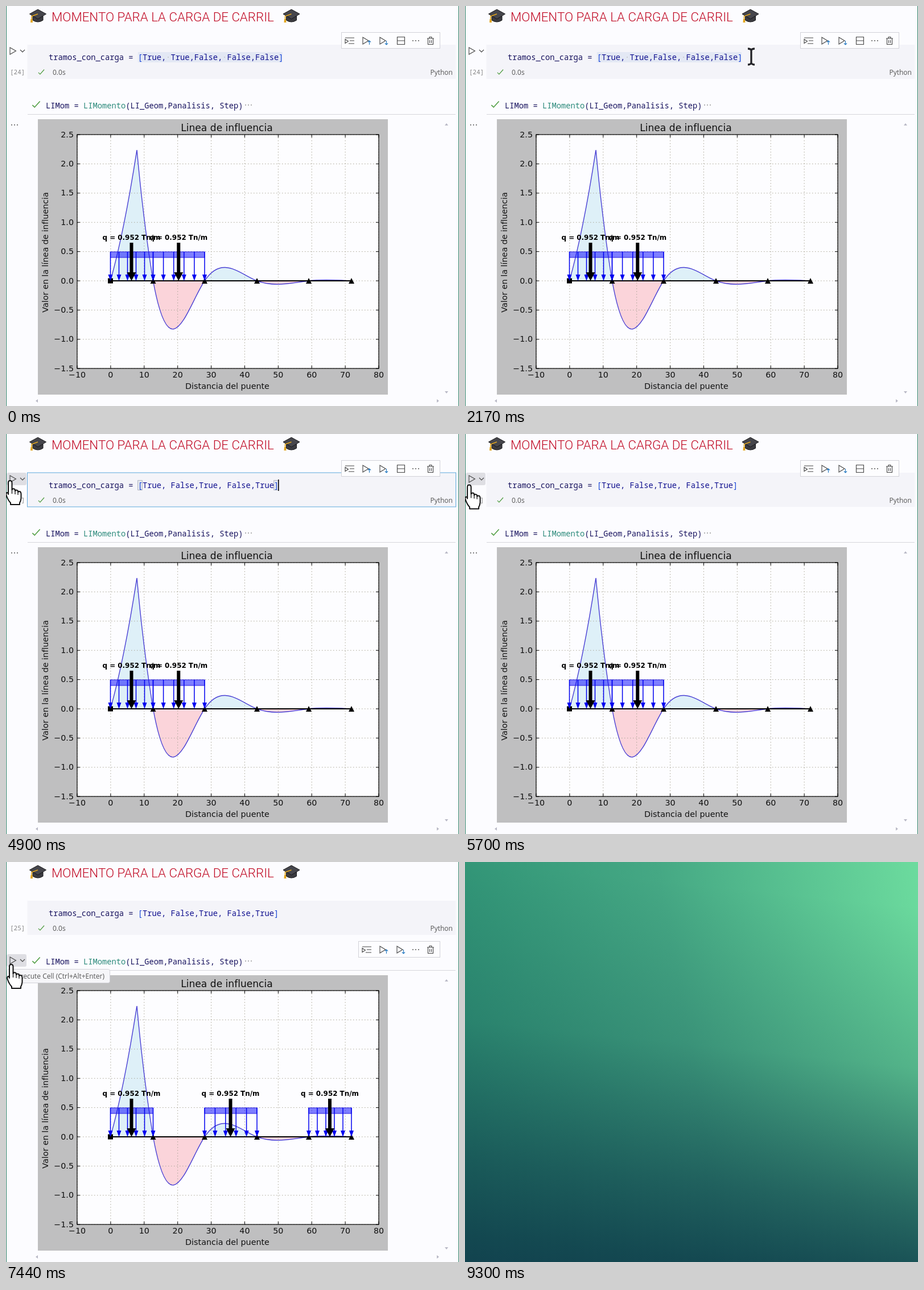
An HTML page for the animation above (9.33 s loop, 796 px wide and 703 px high).

```html
<!DOCTYPE html>
<html lang="es">
<head>
<meta charset="utf-8">
<style>
html, body { margin: 0; width: 100%; height: 100%; overflow: hidden; }
body {
  background:
    linear-gradient(186deg, #12454f00 10%, #12454f38 46%, #12454fb8 77%, #12454ff5 94%, #12434f 100%),
    linear-gradient(80deg, #2c9073, #45a884 50%, #6cdb9e);
}
svg { display: block; width: 796px; height: 703px; }
.code { font: 13.75px "Noto Sans Mono", monospace; fill: #17125e; white-space: pre; }
.ui { font: 12px "Open Sans", sans-serif; fill: #555; }
.count { font: 11px "Noto Sans Mono", monospace; fill: #858585; }
.plot { font: 14.3px "DejaVu Sans", sans-serif; fill: #111; }
.load { font: bold 11.9px "DejaVu Sans", sans-serif; text-anchor: middle; fill: #000; }
#title { font: 300 26px Roboto, sans-serif; font-stretch: 75%; fill: #c00822; }
.icon { fill: none; stroke: #444; stroke-width: 1.1; }
.ok { fill: none; stroke: #4a9a3c; stroke-width: 1.4; }
.dots { fill: #555; }
.box { fill: #fdfdff; stroke: #d2d2d8; }
</style>
</head>
<body>
<svg id="stage" viewBox="0 0 796 703"></svg>
<script>
const stage = document.getElementById('stage');
const LOOP = 9330;
const X0 = 183.9, Y0 = 483;
const px = v => X0 + v * 5.889;
const py = v => Y0 - v * 102.75;
const supports = [183.5, 258.5, 349, 441, 532, 607];

const at = (x, y, body, extra = '') => `<g transform="translate(${x} ${y})" ${extra}>${body}</g>`;
const line = (x1, y1, x2, y2, extra = '') => `<path d="M${x1} ${y1}L${x2} ${y2}" ${extra}/>`;
const text = (x, y, cls, body, extra = '') => `<text x="${x}" y="${y}" class="${cls}" ${extra}>${body}</text>`;
const group = (id, body) => `<g id="${id}">${body}</g>`;
const range = (n, f) => Array.from({ length: n }, (_, i) => f(i)).join('');

// Icons, each centred on its own origin
const dots = '<g class="dots"><circle cx="-5" r="1"/><circle r="1"/><circle cx="5" r="1"/></g>';
const play = '<path class="icon" d="M-5-6L5.5 0L-5 6Z"/>';
const chevron = '<path class="icon" d="M-4-2L0 2L4-2"/>';
const check = s => `<path class="ok" transform="scale(${s})" d="M-6 1L-2.5 4.5L6-5"/>`;
const runLine = '<path class="icon" d="M-8-5H8M0 0H8M-2 5H8M-8-2.5L-2.5 1L-8 4.5Z"/>';
const playUp = '<path class="icon" d="M-6-6L4 0L-6 6Z"/><path class="icon" style="stroke:#2277c0" d="M5.5 7V0M3 2.5L5.5 0L8 2.5"/>';
const playDown = '<path class="icon" d="M-6-6L4 0L-6 6Z"/><path class="icon" style="stroke:#2277c0" d="M5.5 0V7M3 4.5L5.5 7L8 4.5"/>';
const split = '<path class="icon" d="M-6.5-6.5H6.5V6.5H-6.5ZM-6.5 0H6.5"/>';
const trash = '<path class="icon" d="M-6-4H6M-2-4V-6.500H2V-4M-4.500-4V6.500H4.500V-4M-1.500-1V4M1.500-1V4"/>';
const history = '<path class="icon" stroke-width="1.3" d="M-6-2A6.500 6.500 0 1 1-6 3M-6.500-6V-2H-2.500M0-4V1H4"/>';
const cap = `
  <path fill="#3b3b40" stroke="#17171a" d="M-9 1V8Q0 14 9 8V1Z"/>
  <path fill="#46464c" stroke="#17171a" d="M-14.500-3L0-11L14.500-3L0 6Z"/>
  <path fill="none" stroke="#e2a51c" stroke-width="1.600" d="M0-3L-11 1V8"/>
  <path fill="#e2a51c" d="M-12.500 6H-9.500L-9 12H-13Z"/>`;

const toolbar = (x, y, icons) =>
  `<rect class="box" x="${x + .5}" y="${y + .5}" width="${762 - x}" height="28"/>` +
  icons.map(([cx, icon]) => at(cx, y + 15, icon)).join('');
const runButton = y => at(12, y, play) + at(29, y, chevron);
const hoverBox = y => `<rect x="1" y="${y - 11}" width="35" height="22" rx="3" fill="#dedee3"/>`;

const token = (body, color) => `<tspan fill="${color}">${body}</tspan>`;
const assign = list => text(75, 95, 'code', 'tramos_con_carga = ' +
  token('[', '#1745d8') + token(list, '#10108f') + token(']', '#1745d8'));

// Cubic through a span with given end slopes
const span = (i, s0, s1) => {
  const a = supports[i], b = supports[i + 1], d = (b - a) / 3;
  return { a, curve: `C${a + d} ${Y0 + s0 * d} ${b - d} ${Y0 - s1 * d} ${b} ${Y0}` };
};
const curves = [
  { a: supports[0], curve: `C199 428 216 343 230 253C238 341 249 425 258.5 ${Y0}` },
  span(1, 5.5, -1.5), span(2, -1.5, .4), span(3, .38, -.12), span(4, -.12, .05)
];

const loadOn = i => {
  const a = supports[i], b = supports[i + 1], c = (a + b) / 2 - .5;
  const arrows = range(6, k => {
    const x = a + (b - a) * k / 5;
    return `<path d="M${x} 432V474" stroke="#0000f0" stroke-width="1.500"/>
      <path fill="#0000f0" d="M${x - 4} 472H${x + 4}L${x} 483Z"/>`;
  });
  return `<rect x="${a}" y="432" width="${b - a}" height="10" fill="#0000ff" fill-opacity=".5" stroke="#2a20e0"/>
    ${arrows}
    <path d="M${c - 3} 416H${c + 3}V468H${c + 8}L${c} 483L${c - 8} 468H${c - 3}Z"/>
    ${text(c, 411, 'load', 'q = 0.952 Tn/m')}`;
};

const xTicks = range(10, i => {
  const v = i * 10 - 10, x = px(v);
  return line(x, 226, x, 637, 'stroke="#a8a494" stroke-dasharray="1.500 3.500"') +
    line(x, 637, x, 632, 'stroke="#000"') + line(x, 226, x, 231, 'stroke="#000"') +
    text(x, 653, 'plot', String(v).replace('-', '−'), 'text-anchor="middle"');
});
const yTicks = range(9, i => {
  const v = i / 2 - 1.5, y = py(v);
  return line(125, y, 655, y, 'stroke="#a8a494" stroke-dasharray="1.500 3.500"') +
    line(125, y, 130, y, 'stroke="#000"') + line(650, y, 655, y, 'stroke="#000"') +
    text(119, y + 4.5, 'plot', v.toFixed(1).replace('-', '−'), 'text-anchor="end"');
});

const chart = `
  <rect x="56" y="199" width="615" height="484" fill="#bfbfc0"/>
  <rect x="125" y="226" width="530" height="411" fill="#fdfdff"/>
  ${curves.map((c, i) => `<path fill="${i % 2 ? '#fbd4da' : '#def0f8'}" d="M${c.a} ${Y0}${c.curve}Z"/>`).join('')}
  ${xTicks}${yTicks}
  <rect x="125" y="226" width="530" height="411" fill="none" stroke="#000" stroke-width="1.200"/>
  <path fill="none" stroke="#4a40d4" stroke-width="1.400" d="M183.5 ${Y0}${curves.map(c => c.curve).join('')}"/>
  ${line(183.5, Y0, 607, Y0, 'stroke="#000" stroke-width="2"')}
  <rect x="179" y="478.500" width="9" height="9"/>
  ${supports.slice(1).map(x => `<path d="M${x} 478L${x + 5} 488H${x - 5}Z"/>`).join('')}
  ${group('loadsBefore', loadOn(0) + loadOn(1))}
  ${group('loadsAfter', loadOn(0) + loadOn(2) + loadOn(4))}
  ${text(388, 220, 'plot', 'Linea de influencia', 'text-anchor="middle" style="font-size:17.1px"')}
  ${text(389, 673, 'plot', 'Distancia del puente', 'text-anchor="middle"')}
  ${text(0, 0, 'plot', 'Valor en la línea de influencia', 'text-anchor="middle" transform="translate(74 433) rotate(-90)"')}`;

const beam = 'M-6-14Q-1-14 0-11Q1-14 6-14M0-11V11M-6 14Q-1 14 0 11Q1 14 6 14';
const cursors = group('beam', `
    <path d="${beam}" fill="none" stroke="#fff" stroke-width="6"/>
    <path d="${beam}" fill="none" stroke="#24242a" stroke-width="3.400"/>`) +
  group('hand', `<path fill="#fff" stroke="#111" stroke-width="2" stroke-linejoin="round"
    d="M-3 3Q-3-1 0-1Q3.500-1 3.500 3V15Q5 12 8.500 14L9 17Q11 14 14 17V19Q19 16 19.500 22V30Q19 35 17 38V41H1V38Q-3 34-6 26Q-8 21-5 20Q-3 20-3 23Z"/>
    <path fill="none" stroke="#111" stroke-width="1.300" d="M3.500 14V22M9 16V23M14 18V24"/>`);

stage.innerHTML = group('win', `
  <rect width="796" height="703" fill="#fcfcff"/>
  ${at(56, 17, cap)}${at(501.5, 17, cap)}
  <text id="title" x="80" y="27">MOMENTO PARA LA CARGA DE CARRIL</text>
  <rect id="cell" x="37.500" y="68" width="753" height="60" fill="#f4f4f9"/>
  ${group('before', `<rect id="selection" x="231.800" y="81" width="254" height="18" fill="#e3e8f4"/>
    ${assign('True,  True,False,  False,False'.replace(/  /g, ' '))}
    ${group('spaces', '<circle cx="285" cy="90" r=".800" fill="#aaa"/><circle cx="384" cy="90" r=".800" fill="#aaa"/>')}`)}
  ${group('after', `${group('brackets', '<path fill="#e2e6ee" stroke="#b4b8c4" d="M231.500 81.500h8v17h-8ZM470.500 81.500h8v17h-8Z"/>')}
    ${assign('True, False,True, False,True')}`)}
  <rect id="caret" y="80" width="1.600" height="20"/>
  ${at(62, 116, check(.85))}
  ${text(82, 121, 'ui', '0.0s')}
  ${text(785, 121, 'ui', 'Python', 'text-anchor="end"')}
  ${text(7, 120, 'count', '', 'id="count"')}
  ${line(38, 190.5, 790, 190.5, 'stroke="#d6d6dc"')}
  ${text(70, 180, 'code', `LIMom = ${token('LIMomento', '#2b8a7a')}(LI_Geom,Panalisis, Step)`)}
  ${at(426, 174, dots, 'opacity=".600"')}
  ${group('done', at(53, 173, check(1.1)))}
  ${group('pending', at(53, 173, history))}
  ${at(15, 209, dots)}
  ${group('first', group('hoverFirst', hoverBox(79)) + runButton(79) +
    toolbar(589, 46, [[604, runLine], [633, playUp], [663, playDown], [694, split], [720, dots], [746, trash]]))}
  ${group('second', hoverBox(173) + runButton(173) +
    toolbar(619, 139, [[634, runLine], [663, playUp], [693, playDown], [720, dots], [746, trash]]))}
  ${chart}
  <path fill="#b9b9c6" d="M771 210h6l-3-4ZM771 677h6l-3 4ZM56 691v6l-4-3ZM757 691v6l4-3Z"/>
  ${group('tip', `<rect class="box" x="1.500" y="188.500" width="181" height="24" rx="3" style="fill:#f6f6f9"/>
    ${text(173, 205, 'ui', 'Execute Cell (Ctrl+Alt+Enter)', 'text-anchor="end"')}`)}
  <path fill="none" stroke="#2f8068" d="M.5 0V703M795.500 0V703"/>
  ${group('cursor', cursors)}`);

const el = id => document.getElementById(id);
const title = el('title');
if (title.getComputedTextLength() > 425) title.style.fontSize = '22.3px';

const show = (id, on) => el(id).style.display = on ? '' : 'none';
const between = (t, a, b) => t >= a && t < b;
const clamp = v => Math.min(1, Math.max(0, v));
const ease = v => v * v * (3 - 2 * v);

// time, x, y
const path = [
  [1300, 806, 100], [1950, 503, 89], [2900, 503, 89], [3350, 564, 96],
  [3900, 564, 96], [4650, 7, 83], [5600, 7, 83], [6200, 9, 181]
];
function pointer(t) {
  const next = path.findIndex(p => p[0] > t);
  if (next < 0) return path[path.length - 1].slice(1);
  if (!next) return path[0].slice(1);
  const [ta, xa, ya] = path[next - 1], [tb, xb, yb] = path[next];
  const k = ease((t - ta) / (tb - ta));
  return [xa + (xb - xa) * k, ya + (yb - ya) * k];
}

function render(t) {
  const edited = t >= 2900, focused = between(t, 2500, 5200), ran = t >= 7050;
  const [x, y] = pointer(t);
  const onGutter = x < 37, onSecond = onGutter && y > 130;

  show('before', !edited);
  show('after', edited);
  show('selection', t < 2500);
  show('spaces', t < 2500);
  show('brackets', focused);
  show('caret', focused);
  el('caret').setAttribute('x', edited ? 478 : 486);
  el('cell').setAttribute('stroke', focused ? '#5fa9dc' : 'none');
  el('count').textContent = t < 5350 ? '[24]' : '[25]';

  show('first', !onSecond);
  show('second', onSecond);
  show('hoverFirst', onGutter);
  show('pending', between(t, 6600, 7050));
  show('done', !between(t, 6600, 7050));
  show('tip', t >= 7000);
  show('loadsBefore', !ran);
  show('loadsAfter', ran);

  show('cursor', t >= 1300);
  show('hand', onGutter);
  show('beam', !onGutter);
  el('cursor').setAttribute('transform', `translate(${x} ${y})`);
  el('win').setAttribute('opacity', 1 - clamp((t - 9100) / 170));
}

const start = performance.now();
function tick() {
  render((performance.now() - start) % LOOP);
  requestAnimationFrame(tick);
}
tick();
</script>
</body>
</html>
```
